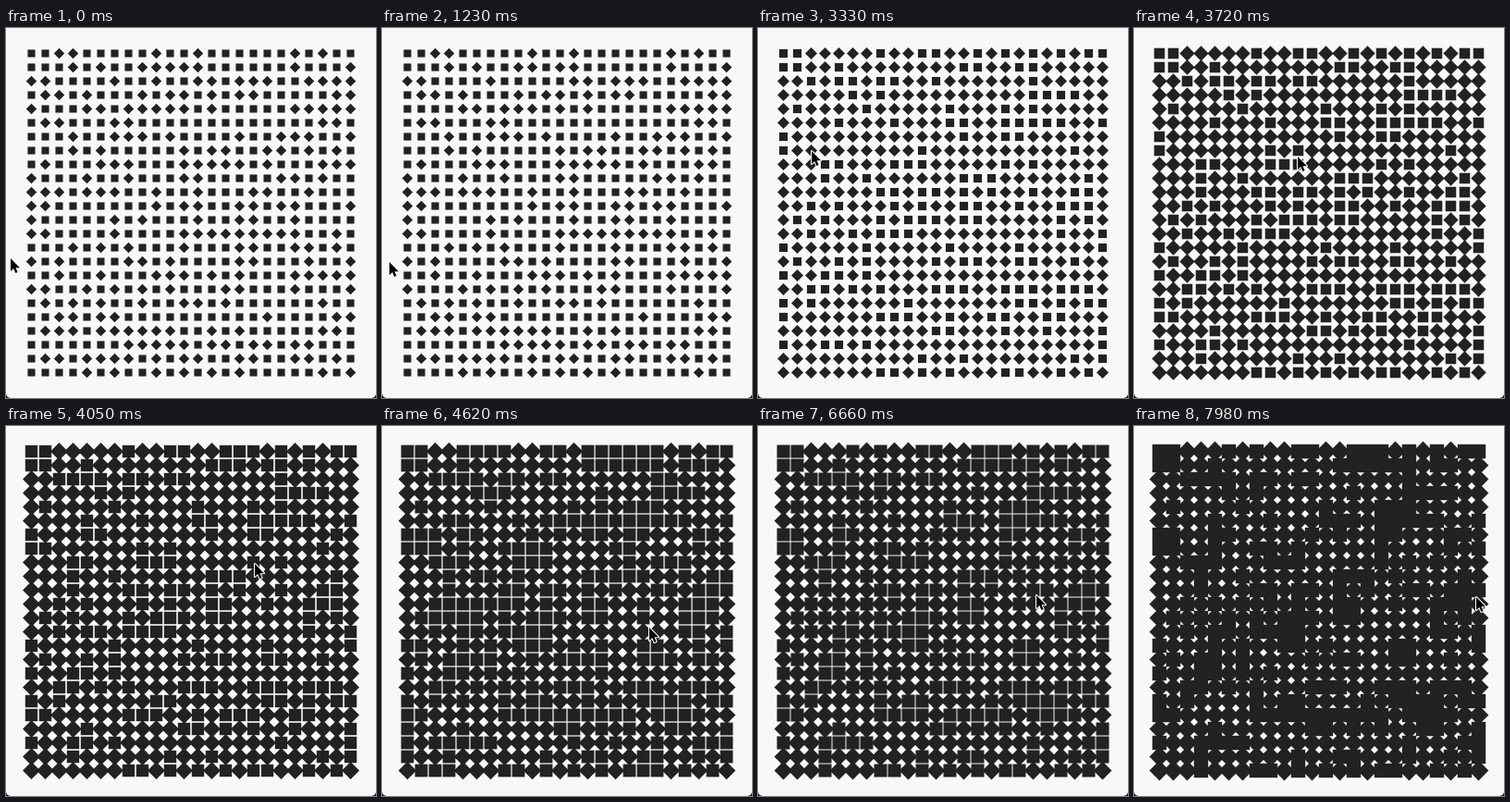
Recreate the animation shown at these times as an HTML page with a canvas. Size 400 by 400 pixels, loop 8 s.

```html
<!DOCTYPE html>
<html lang="en">
<head>
<meta charset="utf-8">
<title>Squares and diamonds</title>
<style>
  html, body { margin: 0; width: 100%; height: 100%; overflow: hidden; background: #222; }
  canvas { display: block; width: 400px; height: 400px; border-radius: 0 0 5px 5px; background: #f8f8f8; }
</style>
</head>
<body>
<canvas id="stage" width="400" height="400"></canvas>
<script>
const SIZE = 400, LOOP = 8000, TICK = 30;
const COUNT = 24, STEP = 15, FIRST = 27.5;
const ctx = document.getElementById('stage').getContext('2d');

// Pointer stops; the path between them is smooth
const stops = [
  { t: 0, x: 5, y: 249 },
  { t: 1110, x: 5, y: 249 },
  { t: 1890, x: 50, y: 307 },
  { t: 3090, x: 57, y: 133 },
  { t: 3300, x: 57, y: 133 },
  { t: 4050, x: 269, y: 149 },
  { t: 5000, x: 294, y: 250 },
  { t: 5490, x: 296, y: 225 },
  { t: 6660, x: 301, y: 183 },
  { t: 8000, x: 370, y: 185 }
];

function seeded(seed) {
  return () => {
    seed = (seed + 0x6D2B79F5) | 0;
    let n = Math.imul(seed ^ (seed >>> 15), 1 | seed);
    n = (n + Math.imul(n ^ (n >>> 7), 61 | n)) ^ n;
    return ((n ^ (n >>> 14)) >>> 0) / 2 ** 32;
  };
}

const random = seeded(7);
const cells = Array.from({ length: COUNT * COUNT }, (_, i) => ({
  x: FIRST + STEP * (i % COUNT),
  y: FIRST + STEP * Math.floor(i / COUNT),
  limit: random()
}));

function slope(i, axis) {
  const a = stops[i], b = stops[i + 1];
  return a && b ? (b[axis] - a[axis]) / (b.t - a.t) : 0;
}

// Harmonic mean keeps the curve monotone and rests at turning points
function tangent(i, axis) {
  const a = slope(i - 1, axis), b = slope(i, axis);
  return a * b > 0 ? 2 * a * b / (a + b) : 0;
}

function pointer(time, axis) {
  const i = stops.findLastIndex(stop => stop.t <= time);
  const a = stops[i], b = stops[i + 1], span = b.t - a.t;
  const u = (time - a.t) / span, v = 1 - u;
  return Math.round(a[axis] * v * v * (1 + 2 * u) + b[axis] * u * u * (1 + 2 * v)
    + span * u * v * (v * tangent(i, axis) - u * tangent(i + 1, axis)));
}

// Cells whose limit is under the level stand square, the others are turned
function drawCells(size, level) {
  const half = size / 2, tip = size * Math.SQRT1_2;
  ctx.fillStyle = '#222';
  for (const { x, y, limit } of cells) {
    if (limit < level) {
      ctx.fillRect(x - half, y - half, size, size);
      continue;
    }
    ctx.beginPath();
    ctx.moveTo(x, y - tip);
    ctx.lineTo(x + tip, y);
    ctx.lineTo(x, y + tip);
    ctx.lineTo(x - tip, y);
    ctx.fill();
  }
}

const arrow = new Path2D('M0 0V14L3.2 11L5.4 16L7.6 15L5.5 10.2H10Z');

function drawPointer(x, y) {
  ctx.save();
  ctx.translate(x, y);
  ctx.lineWidth = 2;
  ctx.lineJoin = 'round';
  ctx.strokeStyle = '#fff';
  ctx.stroke(arrow);
  ctx.fillStyle = '#000';
  ctx.fill(arrow);
  ctx.restore();
}

function draw(now) {
  const time = Math.floor((now % LOOP) / TICK) * TICK;
  const x = pointer(time, 'x'), y = pointer(time, 'y');
  ctx.clearRect(0, 0, SIZE, SIZE);
  drawCells(8 + 8 * x / SIZE, y / SIZE);
  drawPointer(x, y);
}

const start = performance.now();
function loop() {
  draw(performance.now() - start);
  requestAnimationFrame(loop);
}
loop();
</script>
</body>
</html>
```
